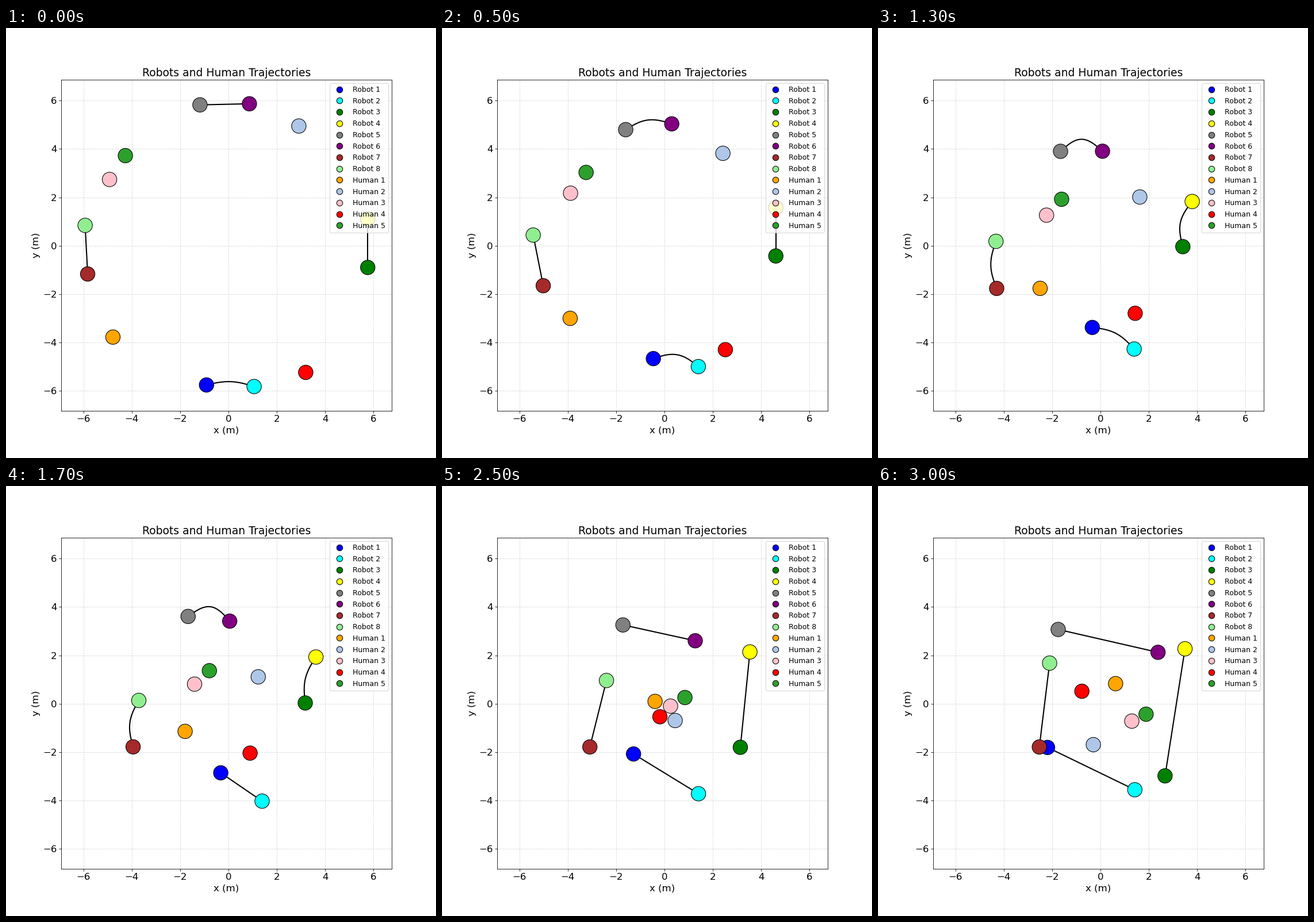
Recreate the animation shown at these times as a matplotlib script. Size 748 by 748 pixels, loop 3100 ms.

```python
import numpy as np
import matplotlib.pyplot as plt
from matplotlib.animation import FuncAnimation
from matplotlib.lines import Line2D
from matplotlib.patches import Circle

FRAMES = 31
INTERVAL = 100
CABLE = 2.0
RADIUS = 0.3
STEPS = np.arange(FRAMES)

# Key points {step: (x, y)} in metres, only where the motion turns.
ROBOTS = {
    "blue": {0: (-.91, -5.76), 5: (-.46, -4.67), 17: (-.32, -2.86),
             25: (-1.28, -2.08), 30: (-2.19, -1.81)},
    "cyan": {0: (1.06, -5.825), 5: (1.4, -5), 17: (1.39, -4.03),
             30: (1.42, -3.56)},
    "green": {0: (5.76, -.9), 5: (4.605, -.425), 17: (3.175, .03),
              21: (3.345, -.87), 30: (2.67, -2.985)},
    "yellow": {0: (5.76, 1.11), 5: (4.605, 1.575), 17: (3.615, 1.93),
               30: (3.495, 2.27)},
    "gray": {0: (-1.18, 5.825), 5: (-1.605, 4.8), 17: (-1.67, 3.61),
             30: (-1.75, 3.07)},
    "purple": {0: (.865, 5.87), 5: (.3, 5.04), 17: (.05, 3.415),
               30: (2.38, 2.125)},
    "brown": {0: (-5.825, -1.17), 5: (-5.015, -1.655), 17: (-3.945, -1.785),
              30: (-2.53, -1.79)},
    "lightgreen": {0: (-5.93, .84), 5: (-5.43, .44), 17: (-3.71, .135),
                   25: (-2.4, .96), 30: (-2.105, 1.68)},
}
HUMANS = {
    "orange": {0: (-4.78, -3.78), 25: (-.39, .095), 30: (.625, .83)},
    "#aec7e8": {0: (2.91, 4.95), 25: (.44, -.695), 30: (-.295, -1.695)},
    "pink": {0: (-4.92, 2.74), 25: (.25, -.1), 30: (1.295, -.72)},
    "red": {0: (3.195, -5.24), 25: (-.19, -.54), 30: (-.77, .515)},
    "#2ca02c": {0: (-4.265, 3.725), 25: (.845, .255), 30: (1.885, -.435)},
}


def steady(t, v):
    """Constant speed between key points."""
    return np.interp(STEPS, t, v)


def eased(t, v):
    """Monotone cubic through the key points."""
    h = np.diff(t)
    s = np.diff(v) / h
    a, b = s[:-1], s[1:]
    same = a * b > 0
    inner = np.where(same, 2 * a * b / np.where(same, a + b, 1), 0)
    m = np.concatenate([s[:1], inner, s[-1:]])
    k = np.clip(np.searchsorted(t, STEPS, side="right") - 1, 0, len(h) - 1)
    u = (STEPS - t[k]) / h[k]
    return (v[k] * (1 + 2 * u) * (1 - u) ** 2
            + v[k + 1] * u ** 2 * (3 - 2 * u)
            + h[k] * u * (1 - u) * (m[k] * (1 - u) - m[k + 1] * u))


def path(keys, motion):
    t = np.array(list(keys), float)
    xy = np.array(list(keys.values()))
    return np.column_stack([motion(t, xy[:, 0]), motion(t, xy[:, 1])])


def cable_points(p, q):
    """Slack cable bowed to the left of p -> q, straight once taut."""
    chord = q - p
    dist = np.hypot(*chord)
    bow = np.sqrt(max(CABLE ** 2 - dist ** 2, 0)) / 2
    normal = np.array([-chord[1], chord[0]]) / dist
    u = np.linspace(0, 1, 40)[:, None]
    return p + u * chord + np.sin(np.pi * u) * bow * normal


paths = ([path(keys, eased) for keys in ROBOTS.values()]
         + [path(keys, steady) for keys in HUMANS.values()])
colors = [*ROBOTS, *HUMANS]
labels = [f"{kind} {i + 1}" for kind, group in
          (("Robot", ROBOTS), ("Human", HUMANS)) for i in range(len(group))]

fig, ax = plt.subplots(figsize=(10, 10), dpi=74.8)
ax.set_aspect("equal")
ax.set_xlim(-6.93, 6.755)
ax.set_ylim(-6.825, 6.87)
ticks = range(-6, 7, 2)
ax.set_xticks(ticks)
ax.set_yticks(ticks)
ax.tick_params(labelsize=16)
ax.set_title("Robots and Human Trajectories", fontsize=18)
ax.set_xlabel("x (m)", fontsize=16)
ax.set_ylabel("y (m)", fontsize=16)
ax.set_axisbelow(True)
ax.grid(True, linestyle="--", alpha=0.5)

cables = [ax.plot([], [], color="black", lw=2, zorder=2)[0]
          for _ in range(len(ROBOTS) // 2)]
discs = [ax.add_patch(Circle(p[0], RADIUS, fc=c, ec="black", lw=1, zorder=3))
         for p, c in zip(paths, colors)]

handles = [Line2D([], [], marker="o", ls="none", markersize=10,
                  mfc=c, mec="black", label=name)
           for c, name in zip(colors, labels)]
ax.legend(handles=handles, loc="upper right", fontsize=12,
          labelspacing=0.54).set_zorder(5)


def update(step):
    for disc, p in zip(discs, paths):
        disc.center = p[step]
    for i, cable in enumerate(cables):
        cable.set_data(*cable_points(paths[2 * i][step],
                                     paths[2 * i + 1][step]).T)
    return discs + cables


anim = FuncAnimation(fig, update, frames=FRAMES, interval=INTERVAL,
                     repeat=True, repeat_delay=0)
plt.show()
```
